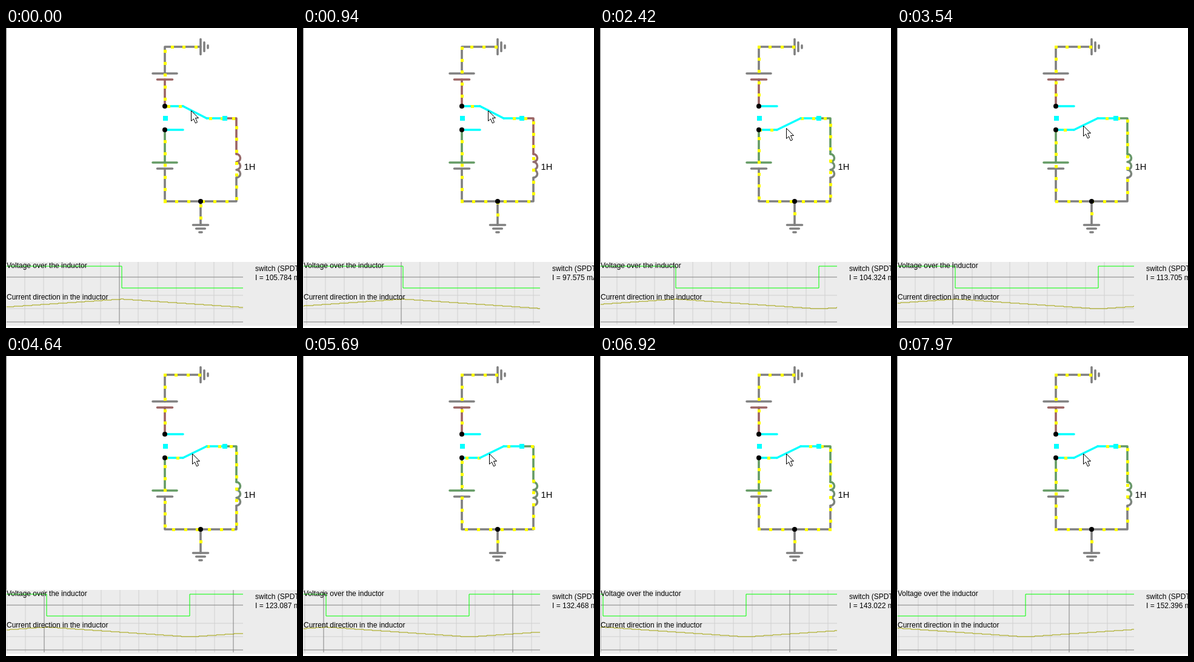
Write an HTML page with a canvas that moves like this. It is 480x495 px and loops after 8000 ms.

```html
<!DOCTYPE html>
<html lang="en">
<head>
<meta charset="utf-8">
<title>Inductor circuit</title>
<style>
html, body { margin: 0; width: 100%; height: 100%; overflow: hidden; background: #fff; }
canvas { display: block; }
</style>
</head>
<body>
<canvas id="stage" width="480" height="495"></canvas>
<script>
const g = document.getElementById('stage').getContext('2d');
const LOOP = 8000, REFRESH = 135.1, SWITCH = 1300;
const STEP = 19.6;        // distance between current dots
const SPEED = 0.02698;    // scope scroll, px per ms
const GRAY = '#808080', RED = '#9b6464', GREEN = '#649b64', CYAN = '#00ffff';
const FONT = '"Liberation Sans", Arial, sans-serif';

// travel of the dots around the loop: [ms, px]
const travel = [[0, 4.2], [940, 12], [2420, 27.6], [3540, 34.6], [5690, 60.4],
  [6920, 72.1], [7970, 92.4]];

function lerp(points, t) {
  const i = Math.max(1, points.findIndex(p => p[0] >= t));
  const [a, p] = points[i - 1], [b, q] = points[i];
  return p + (q - p) * (t - a) / (b - a);
}

function line(color, width, ...p) {
  g.strokeStyle = color;
  g.lineWidth = width;
  g.beginPath();
  for (let i = 0; i < p.length; i += 2) g.lineTo(p[i], p[i + 1]);
  g.stroke();
}
const wire = (color, ...p) => line(color, 3.6, ...p);

// bar of a battery or ground sign, centred on x, y
const flat = (color, x, y, half) => wire(color, x - half, y, x + half, y);
const upright = (color, x, y, half) => wire(color, x, y - half, x, y + half);

function box(color, x, y, size) {
  g.fillStyle = color;
  g.fillRect(Math.round(x - size / 2), Math.round(y - size / 2), size, size);
}

function dots(flow, x1, y1, x2, y2) {
  const len = Math.hypot(x2 - x1, y2 - y1);
  for (let d = flow % STEP; d < len; d += STEP)
    box('#ffff00', x1 + (x2 - x1) * d / len, y1 + (y2 - y1) * d / len, 5);
}

function text(str, x, y, size = 12) {
  g.fillStyle = '#000';
  g.font = size + 'px ' + FONT;
  g.fillText(str, x, y);
}

function node(x, y) {
  g.fillStyle = '#000';
  g.beginPath();
  g.arc(x, y, 4, 0, 7);
  g.fill();
}

function circuit(t) {
  const down = t >= SWITCH, live = down ? GREEN : RED, poleY = down ? 168 : 129;
  g.lineCap = g.lineJoin = 'round';

  // upper ground and battery
  wire(GRAY, 262, 75, 262, 31, 321, 31);
  for (let i = 0; i < 3; i++) upright(GRAY, 321 + 6 * i, 31, 12.5 - 5.2 * i);
  flat(GRAY, 262, 75, 20);
  flat(RED, 262, 85, 12.5);
  wire(RED, 262, 85, 262, 129);

  // lower battery, bottom rail and ground
  wire(GREEN, 262, 168, 262, 222);
  flat(GREEN, 262, 222, 20);
  flat(GRAY, 262, 232, 12.5);
  wire(GRAY, 262, 232, 262, 286, 380, 286, 380, 247);
  wire(GRAY, 321, 286, 321, 325);
  for (let i = 0; i < 3; i++) flat(GRAY, 321, 325 + 6 * i, 12.5 - 5.2 * i);

  // inductor
  wire(live, 361, 149, 380, 149, 380, 208);
  const shade = g.createLinearGradient(0, 208, 0, 247);
  shade.addColorStop(0, live);
  shade.addColorStop(1, GRAY);
  g.strokeStyle = shade;
  g.beginPath();
  for (let i = 0; i < 3; i++)
    g.arc(380, 214.5 + 13 * i, 6.5, -Math.PI / 2, Math.PI / 2);
  g.stroke();
  text('1H', 392.5, 234, 14.7);

  // switch leads
  wire(CYAN, 262, 129, 292, 129);
  wire(CYAN, 262, 168, 292, 168);
  wire(CYAN, 361, 149, 331, 149);

  const p = lerp(travel, t);
  const upper = 12 + 0.0052 * Math.min(t, SWITCH);
  const lower = down ? p + 6.5 : 0;
  dots(upper, 262, 129, 262, 31);
  dots(upper, 262, 31, 321, 31);
  dots(upper, 321, 325, 321, 286);
  dots(lower, 262, 168, 262, 286);
  dots(lower, 262, 286, 321, 286);
  dots(down ? lower : p, 321, 286, 380, 286);
  dots(p, 380, 286, 380, 149);
  dots(p, 380, 149, 361, 149);
  dots(p, 361, 149, 331, 149);
  dots(p, 292, poleY, 262, poleY);

  wire(CYAN, 331, 149, 292, poleY);
  box(CYAN, 263, 149, 8);
  box(CYAN, 361, 149, 8);
  node(262, 129);
  node(262, 168);
  node(321, 286);
}

function scope(t) {
  const shift = SPEED * t;
  const fall = Math.round(190.6 - shift), rise = Math.round(426.6 - shift);
  g.fillStyle = '#ececec';
  g.fillRect(0, 386, 480, 105.5);
  g.lineCap = 'butt';
  g.lineJoin = 'miter';

  g.save();
  g.beginPath();
  g.rect(1, 386, 390, 104);
  g.clip();
  for (const y of [441, 463]) line('#d0d0d0', 1, 0, y, 391, y);
  for (let i = -6; i < 20; i++) {
    const x = Math.round(187.2 - shift + 31.2 * i);
    line(i % 10 ? '#d0d0d0' : GRAY, 1, x, 386, x, 489);
  }
  for (const y of [411, 485]) line(GRAY, 1, 0, y, 391, y);

  line('#00ff00', 1, -60, 393, fall, 393, fall, 429, rise, 429, rise, 393, 700, 393);

  // triangle wave in steps of one pixel
  const path = [];
  for (let x = 0; x < 391; x++) {
    const lag = x < rise ? Math.abs(x - fall) : 2 * rise - fall - x;
    const y = Math.round(447.3 + lag * 0.0685);
    path.push(x, y, x + 1, y);
  }
  line('#a0a000', 1, ...path);
  g.restore();

  const current = 94.5 + 0.00868 * Math.abs(t - SWITCH);
  text('Voltage over the inductor', 1, 396);
  text('Current direction in the inductor', 1, 448);
  text('switch (SPDT)', 411, 401);
  text('I = ' + current.toFixed(3) + ' mA', 411, 416);
}

function cursor(t) {
  const [x, y] = t < SWITCH ? [305.5, 136.5] : t < 2500 ? [307.5, 165.5] : [307.5, 161.5];
  const shape = [0, 0, 0, 17, 4, 13.5, 7, 20.5, 10, 19, 7, 12, 12, 12];
  g.lineJoin = 'miter';
  g.lineWidth = 1;
  g.strokeStyle = '#000';
  g.fillStyle = '#fff';
  g.beginPath();
  for (let i = 0; i < shape.length; i += 2) g.lineTo(x + shape[i], y + shape[i + 1]);
  g.closePath();
  g.fill();
  g.stroke();
}

function draw(time) {
  const t = Math.min(7970, Math.floor((time + 20) / REFRESH) * REFRESH);
  g.fillStyle = '#fff';
  g.fillRect(0, 0, 480, 495);
  line(GRAY, 1, 0.5, 0, 0.5, 386);
  circuit(t);
  scope(t);
  cursor(t);
}

const start = performance.now();
function tick() {
  draw((performance.now() - start) % LOOP);
  requestAnimationFrame(tick);
}
tick();
</script>
</body>
</html>
```
